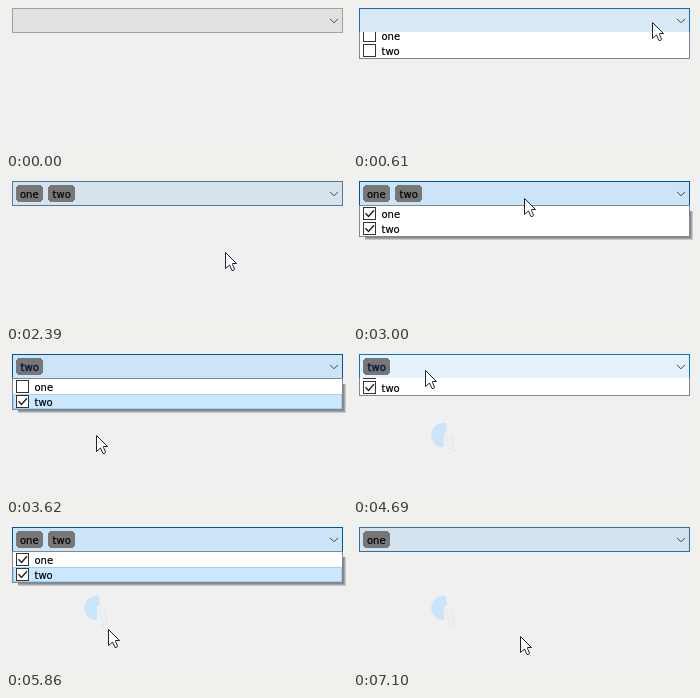
Animation, 341 px wide and 145 px high, one loop 7170 ms. Source, as an HTML page:

```html
<!DOCTYPE html>
<html lang="en">
<head>
<meta charset="utf-8">
<title>Checkable combo box</title>
<style>
html, body { margin: 0; width: 100%; height: 100%; overflow: hidden; background: #f0f0f0; }
svg { display: block; width: 341px; height: 145px; }
text { font: 10px "DejaVu Sans", Tahoma, sans-serif; fill: #000; stroke: #000; stroke-width: .2px; }
.mixed { fill: #0b1d40; stroke: #0b1d40; stroke-width: .5px; }
</style>
</head>
<body>
<svg id="stage" viewBox="0 0 341 145"></svg>
<script>
const LOOP = 7170, TICK = 77, LAST = 92;
const stage = document.getElementById('stage');

// The pointer rests at each stop and acts as it leaves; times in ticks.
const stop = (arrive, leave, x, y, act) => ({ arrive, leave, x, y, act });
const stops = [
  stop(0, 0, 350, -25),
  stop(7, 7, 300, 14, 'open'),
  stop(13, 13, 293, 35, 'one'),
  stop(20, 22, 271, 47, 'two'),
  stop(28, 28, 231, 93, 'close'),
  stop(37, 37, 186, 14, 'open'),
  stop(44, 44, 110, 38, 'one'),
  stop(47, 51, 90, 83, 'close'),
  stop(60, 61, 72, 18, 'open'),
  stop(69, 72, 60, 36, 'one'),
  stop(76, 80, 102, 104),
  stop(84, 86, 120, 47, 'two'),
  stop(90, 90, 167, 111, 'close')
];

const idle = { fill: [225, 225, 225], line: [160, 160, 160] };
const hover = { fill: [229, 241, 251], line: [0, 120, 215] };
const down = { fill: [204, 228, 247], line: [0, 84, 153] };

const clamp = v => Math.min(1, Math.max(0, v));
const smooth = f => f * f * (3 - 2 * f);
const blend = (a, b, f) => a.map((v, i) => Math.round(v + (b[i] - v) * f));
const rect = (x, y, w, h, fill, more = '') =>
  `<rect x="${x}" y="${y}" width="${w}" height="${h}" fill="${fill}" ${more}/>`;
const shape = (d, fill, more = '') => `<path d="${d}" fill="${fill}" ${more}/>`;
const label = (x, y, s, cls = '') => `<text x="${x}" y="${y}" class="${cls}">${s}</text>`;

function pointer(k) {
  const i = stops.findIndex(s => k <= s.leave);
  const to = stops.at(i), from = stops[i - 1] || to;
  const f = smooth(clamp((k - from.leave) / (to.arrive - from.leave || 1)));
  return blend([from.x, from.y], [to.x, to.y], f);
}

// Replays the clicks up to tick k.
function stateAt(k) {
  const s = { open: false, age: 0, one: false, two: false, row: 0, press: 0, over: 0 };
  for (let i = 0; i <= k; i++) {
    const y = pointer(i)[1];
    const inside = y >= 2 && y < 27;
    s.press = clamp(s.press + (s.open ? 1 / 2 : -1 / 6));
    s.over = clamp(s.over + (inside && !s.open ? 1 / 3 : -1 / 3));
    s.age++;
    const act = stops.find(p => p.leave === i)?.act;
    if (act === 'open') Object.assign(s, { open: true, age: 0, row: 0 });
    else if (act === 'close') s.open = false;
    else if (act) s[act] = !s[act];
    if (s.open && y >= 27 && y < 58) s.row = y < 42 ? 1 : 2;
  }
  return s;
}

function tag(x, s, cls) {
  return rect(x, 6, 27, 17, '#777', 'rx="4" shape-rendering="crispEdges"') +
    label(x + (s === 'two' ? 4.6 : 4), 19, s, cls);
}

function combo({ one, two, press, over }) {
  const tone = p => `rgb(${blend(blend(idle[p], hover[p], over), down[p], press)})`;
  let out = rect(6.5, 2.5, 330, 24, tone('fill'), `stroke="${tone('line')}"`);
  out += shape('M324 12.8l4 4 4-4', 'none', 'stroke="#444"');
  if (one) out += tag(10, 'one');
  if (two) out += tag(one ? 42 : 10, 'two', one ? '' : 'mixed');
  return out;
}

function row(y, s, on, lit) {
  let out = lit ? rect(7.5, y + .5, 328, 14, '#cce8ff', 'stroke="#99d1ff"') : '';
  out += rect(10.5, y + 1.5, 12, 12, '#fff', 'stroke="#333"');
  if (on) out += shape(`M12.5 ${y + 7.3}l3 3.2 5.5-6.3`, 'none', 'stroke="#222" stroke-width="1.4"');
  return out + label(28.5, y + 12, s);
}

function popup({ open, age, one, two, row: lit }) {
  if (!open) return '';
  const lift = Math.max(0, 14 - 9 * age);
  let out = '';
  if (!lift) for (let i = 1; i < 5; i++) out += rect(12, 32, 324 + i, 25 + i, '#000', 'opacity=".17"');
  out += '<clipPath id="drop"><rect x="0" y="26" width="341" height="119"/></clipPath>';
  out += `<g clip-path="url(#drop)"><g transform="translate(0 ${-lift})">`;
  out += rect(6.5, 26.5, 330, 31, '#fff', 'stroke="#828790"');
  out += row(27, 'one', one, lit === 1) + row(42, 'two', two, lit === 2);
  return out + '</g></g>';
}

// pale mark left behind by the click halo
function residue(k) {
  if (k < 53) return '';
  let out = shape('M93 71A12 12 0 0 0 88 95H91V82L94 80Z', '#cbe4f7');
  for (let i = 0; i < 9; i++) {
    out += rect(92 + (i * 5) % 9, 83 + i * 2, 2, 3, '#dcebf7');
  }
  return out;
}

function cursor(k) {
  const [x, y] = pointer(k);
  const hit = y > 27 && stops.some(s => s.act && (k === s.leave || k === s.leave + 1));
  const halo = hit ? `<circle cx="${x}" cy="${y}" r="12" fill="#c4e0f5" opacity=".85"/>` : '';
  return halo + `<g transform="translate(${x} ${y})">` +
    shape('M.5.5V16.5L4.5 13 7 18.5H8.5L9.5 17 7.5 12.5V11.5H11.5Z', '#fff', 'stroke="#1c2233"') + '</g>';
}

function draw(k) {
  const s = stateAt(k);
  stage.innerHTML = rect(0, 0, 341, 145, '#f0f0f0') + residue(k) + combo(s) + popup(s) + cursor(k);
}

let shown = -1;
function tick() {
  const t = performance.now() % LOOP;
  const k = Math.min(LAST, Math.floor((t + 12) / TICK));
  if (k !== shown) draw(shown = k);
  requestAnimationFrame(tick);
}
tick();
</script>
</body>
</html>
```
